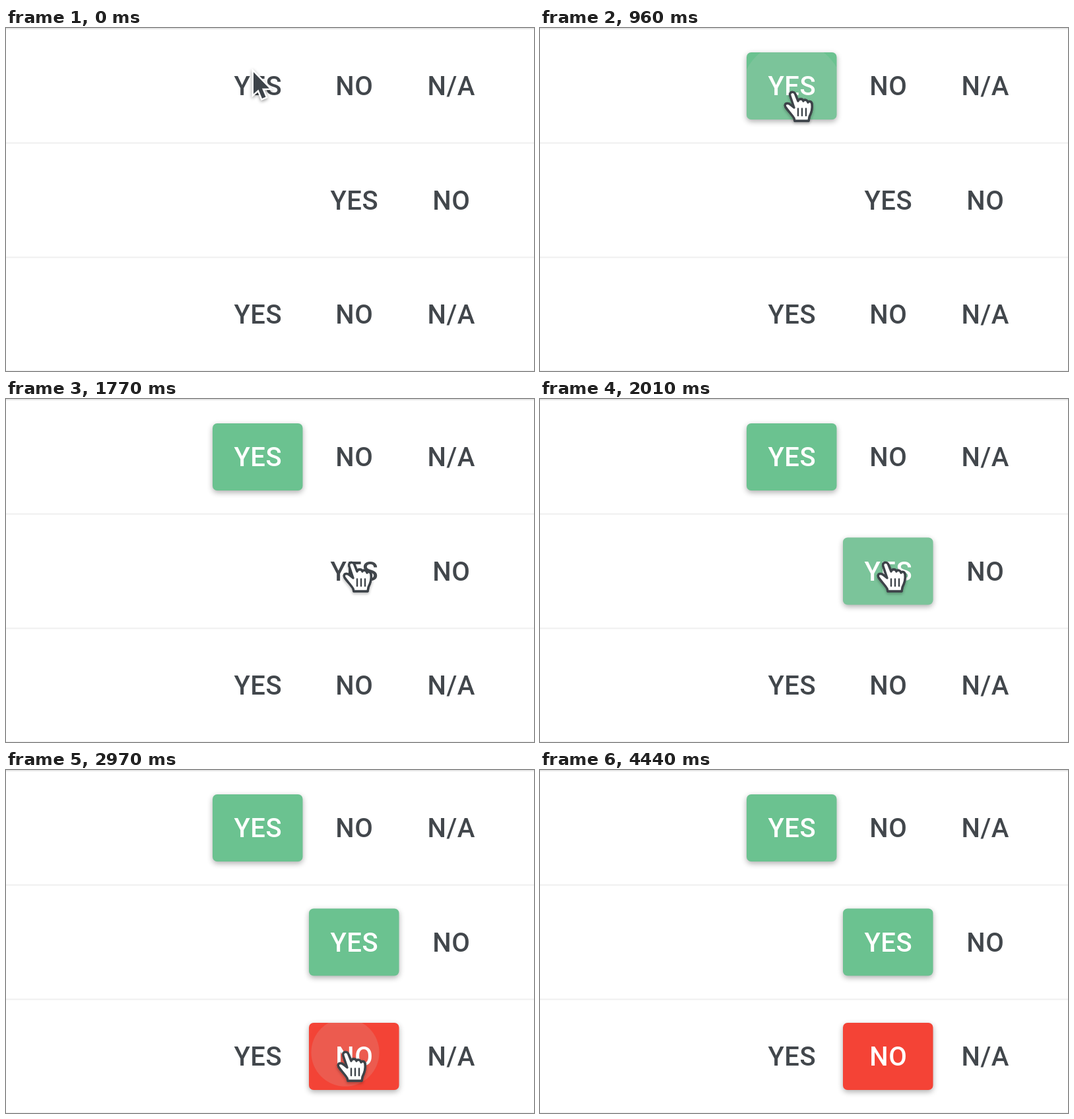
These frames come from a looping animation (800 px wide and 521 px high, 4.47 s). An HTML page with a canvas:

```html
<!DOCTYPE html>
<html lang="en">
<head>
<meta charset="utf-8">
<title>Answer buttons</title>
<style>
html, body { margin: 0; width: 100%; height: 100%; overflow: hidden; background: #fff; }
canvas { display: block; width: 800px; height: 521px; }
</style>
</head>
<body>
<canvas id="stage" width="800" height="521"></canvas>
<script>
const ctx = document.getElementById('stage').getContext('2d');
const LOOP = 4470, STEP = 30;
const INK = [66, 71, 76], WHITE = [255, 255, 255];
const GREEN = [107, 194, 144], RED = [244, 67, 54];
const COLS = [381, 527, 674], ROWS = [88, 261.5, 435];

// Each option: label, column, row, and for chosen ones the press time, fill and ripple centre.
const options = [
  { label: 'YES', col: 0, row: 0, at: 780, fill: GREEN, from: [382, 98] },
  { label: 'NO', col: 1, row: 0 },
  { label: 'N/A', col: 2, row: 0 },
  { label: 'YES', col: 1, row: 1, at: 1770, fill: GREEN, from: [523, 249] },
  { label: 'NO', col: 2, row: 1 },
  { label: 'YES', col: 0, row: 2 },
  { label: 'NO', col: 1, row: 2, at: 2850, fill: RED, from: [514, 429] },
  { label: 'N/A', col: 2, row: 2 }
];

// Pointer moves: start time, end time, end point.
const START = [375, 67];
const moves = [
  [270, 420, [372, 110]],
  [420, 600, [382, 98]],
  [990, 1470, [523, 249]],
  [2070, 2505, [514, 429]]
];
const handTimes = [[360, 1080], [1260, 2190], [2370, LOOP]];

const clamp = v => Math.min(1, Math.max(0, v));
const span = (t, a, b) => clamp((t - a) / (b - a));
const mix = (a, b, p) => a + (b - a) * p;
const ease = p => p < 0.5 ? 4 * p ** 3 : 1 - 4 * (1 - p) ** 3;
const easeOut = p => 1 - (1 - p) ** 3;
const rgb = c => `rgb(${c.map(Math.round).join(',')})`;

function pointerAt(t) {
  let pos = START;
  for (const [a, b, end] of moves) {
    if (t < a) break;
    const p = ease(span(t, a, b));
    pos = pos.map((v, i) => mix(v, end[i], p));
  }
  return pos;
}

function drawLines() {
  ctx.fillStyle = '#e7e7e7';
  ctx.fillRect(0, 0, 800, 2);
  ctx.fillStyle = '#efefef';
  for (const y of [173.6, 347.4, 520]) ctx.fillRect(0, y, 800, 2);
}

function drawButton(o, t, shown) {
  const x = COLS[o.col] - 68, y = ROWS[o.row] - 51;
  ctx.save();
  ctx.globalAlpha = shown;
  ctx.beginPath();
  ctx.roundRect(x, y, 136.5, 102, 7);
  ctx.fillStyle = rgb(o.fill);
  ctx.shadowColor = 'rgba(0,0,0,.32)';
  ctx.shadowBlur = 9;
  ctx.shadowOffsetY = 3;
  ctx.fill();
  ctx.shadowColor = 'transparent';
  ctx.clip();
  const age = t - o.at;
  ctx.globalAlpha = 0.17 * (1 - span(age, 240, 510));
  ctx.fillStyle = 'rgb(200,205,202)';
  ctx.beginPath();
  ctx.arc(...o.from, Math.min(150, age * 0.43), 0, 7);
  ctx.fill();
  ctx.restore();
}

function drawOption(o, t) {
  const shown = o.at && t >= o.at ? easeOut(span(t, o.at, o.at + 150)) : 0;
  if (shown) drawButton(o, t, shown);
  ctx.fillStyle = rgb(INK.map((v, i) => mix(v, WHITE[i], shown)));
  ctx.fillText(o.label, COLS[o.col] + 0.8, ROWS[o.row] + 14.3);
}

function drawArrow() {
  const path = new Path2D('M0 0V33L7.5 26.5L13 40L18.5 37.7L13 24.8H24Z');
  ctx.lineJoin = 'miter';
  ctx.lineWidth = 5;
  ctx.strokeStyle = '#fff';
  ctx.shadowColor = 'rgba(0,0,0,.4)';
  ctx.shadowBlur = 5;
  ctx.shadowOffsetY = 2;
  ctx.stroke(path);
  ctx.shadowColor = 'transparent';
  ctx.fillStyle = '#3d4349';
  ctx.fill(path);
}

function drawHand() {
  const path = new Path2D(
    'M-3 5C-5 -1 3 -3 5 3L9 13C10 9 16 9 17 13C18 10 23 11 24 15' +
    'C26 12 30 14 30 18C31 25 29 31 26 37L25 43H4L3 39' +
    'C0 34 -6 28 -10 22C-13 16 -6 15 -2 19L3 23Z');
  ctx.lineJoin = ctx.lineCap = 'round';
  ctx.strokeStyle = '#3d4349';
  ctx.fillStyle = '#fff';
  ctx.lineWidth = 3.4;
  ctx.shadowColor = 'rgba(0,0,0,.35)';
  ctx.shadowBlur = 4;
  ctx.shadowOffsetY = 2;
  ctx.stroke(path);
  ctx.shadowColor = 'transparent';
  ctx.fill(path);
  ctx.stroke(path);
  ctx.lineWidth = 2.4;
  ctx.beginPath();
  for (const x of [9, 15, 21]) {
    ctx.moveTo(x, 24.5);
    ctx.lineTo(x, 35);
  }
  ctx.stroke();
}

function drawPointer(t) {
  const alpha = 1 - span(t, 3690, 3990);
  if (!alpha) return;
  ctx.save();
  ctx.globalAlpha = alpha;
  ctx.translate(...pointerAt(t));
  if (handTimes.some(([a, b]) => t >= a && t < b)) drawHand();
  else drawArrow();
  ctx.restore();
}

function draw(t) {
  ctx.fillStyle = '#fff';
  ctx.fillRect(0, 0, 800, 521);
  drawLines();
  ctx.font = '500 40px Roboto, sans-serif';
  ctx.letterSpacing = '0.5px';
  ctx.textAlign = 'center';
  for (const o of options) drawOption(o, t);
  drawPointer(t);
}

const begin = performance.now();
function tick() {
  const t = (performance.now() - begin) % LOOP;
  draw(Math.floor(t / STEP) * STEP);
  requestAnimationFrame(tick);
}
tick();
</script>
</body>
</html>
```
